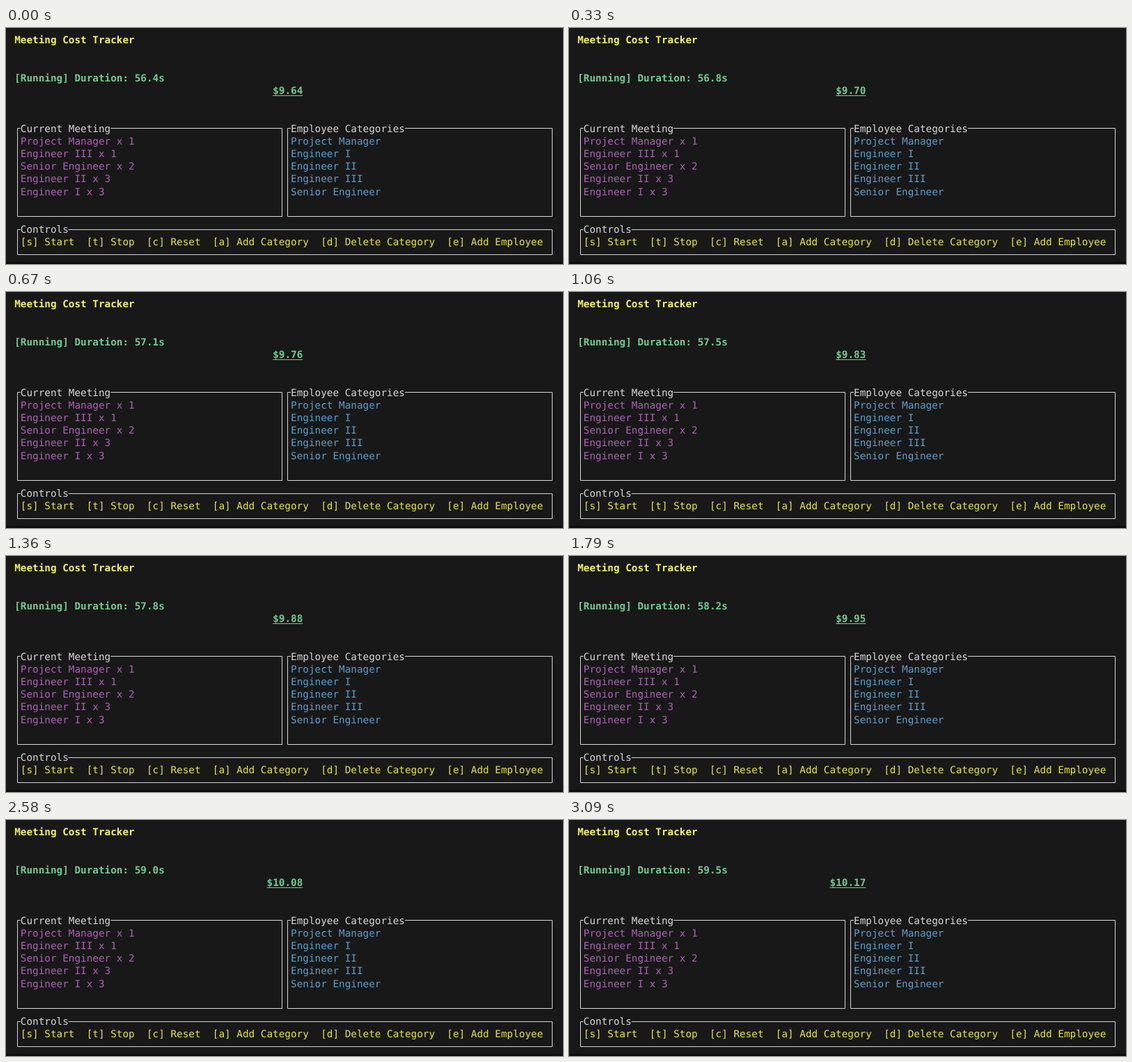
An HTML page for the animation above (3.15 s loop, 800 by 340 pixels).

```html
<!DOCTYPE html>
<html lang="en">
<head>
<meta charset="utf-8">
<title>Meeting Cost Tracker</title>
<style>
html, body { margin: 0; width: 100%; height: 100%; overflow: hidden; background: #181818; }
svg { display: block; }
text {
  font: 14.33px "DejaVu Sans Mono", monospace;
  white-space: pre;
  text-rendering: geometricPrecision;
}
.bold { font-weight: bold; }
path { fill: none; stroke: #d6d6d6; }
</style>
</head>
<body>
<svg id="screen" width="800" height="340" viewBox="0 0 800 340">
  <rect y="337" width="800" height="3" fill="#0f0c0d"/>
</svg>
<script>
const LOOP = 3150, START = 56.435, RATE = 0.170885;
const CELL = 8.627, ROW = 18.2;
const WHITE = '#d6d6d6', TITLE = '#f3f262', GREEN = '#70cb90',
      PURPLE = '#ad5fb6', BLUE = '#5c9dcb', YELLOW = '#e6e442';
// moments at which the terminal redraws its counters, in ms
const TICKS = [0, 60, 120, 180, 240, 330, 360, 450, 520, 580,
  610, 670, 700, 760, 820, 880, 940, 1000, 1060,
  1180, 1240, 1300, 1360, 1430, 1520, 1580, 1670,
  1790, 1880, 1970, 2060, 2120, 2210, 2300,
  2390, 2490, 2580, 2700, 2790, 2880, 2970, 3090];

const screen = document.getElementById('screen');
const colX = col => 12.2 + col * CELL;
const midY = row => 17 + row * ROW;
const snap = v => Math.floor(v) + 0.5;

function add(tag, attrs, text = '') {
  const el = document.createElementNS('http://www.w3.org/2000/svg', tag);
  for (const key in attrs) el.setAttribute(key, attrs[key]);
  el.textContent = text;
  return screen.appendChild(el);
}

function print(col, row, text, fill, cls = '') {
  return add('text', { x: colX(col), y: midY(row) + 5.1, fill, class: cls }, text);
}

function panel(left, right, top, bottom, title, lines, color) {
  const [x0, x1] = [left, right].map(c => snap(colX(c + 0.5)));
  const [y0, y1] = [top, bottom].map(r => snap(midY(r)));
  add('path', { d: `M${colX(left + 1)} ${y0}H${x0}V${y1}H${x1}V${y0}H${colX(left + 1 + title.length)}` });
  print(left + 1, top, title, WHITE);
  lines.forEach((line, i) => print(left + 1, top + 1 + i, line, color));
}

print(0, 0, 'Meeting Cost Tracker', TITLE, 'bold');
const duration = print(0, 3, '', GREEN, 'bold');
const cost = print(43, 4, '', GREEN, 'bold');
const underline = add('path', { style: `stroke:${GREEN}` });

panel(0, 44, 7, 14, 'Current Meeting', ['Project Manager x 1', 'Engineer III x 1',
  'Senior Engineer x 2', 'Engineer II x 3', 'Engineer I x 3'], PURPLE);
panel(45, 89, 7, 14, 'Employee Categories', ['Project Manager', 'Engineer I',
  'Engineer II', 'Engineer III', 'Senior Engineer'], BLUE);
panel(0, 89, 15, 17, 'Controls', [['[s] Start', '[t] Stop', '[c] Reset',
  '[a] Add Category', '[d] Delete Category', '[e] Add Employee'].join('  ')], YELLOW);

function draw(now) {
  const t = now % LOOP;
  const elapsed = START + TICKS.findLast(tick => tick <= t) / 1000;
  const price = '$' + (elapsed * RATE).toFixed(2);
  const x = colX(48 - price.length);
  duration.textContent = `[Running] Duration: ${elapsed.toFixed(1)}s`;
  cost.textContent = price;
  cost.setAttribute('x', x);
  underline.setAttribute('d', `M${x} 97.5H${colX(48)}`);
}

function frame() {
  draw(performance.now());
  requestAnimationFrame(frame);
}
frame();
</script>
</body>
</html>
```
